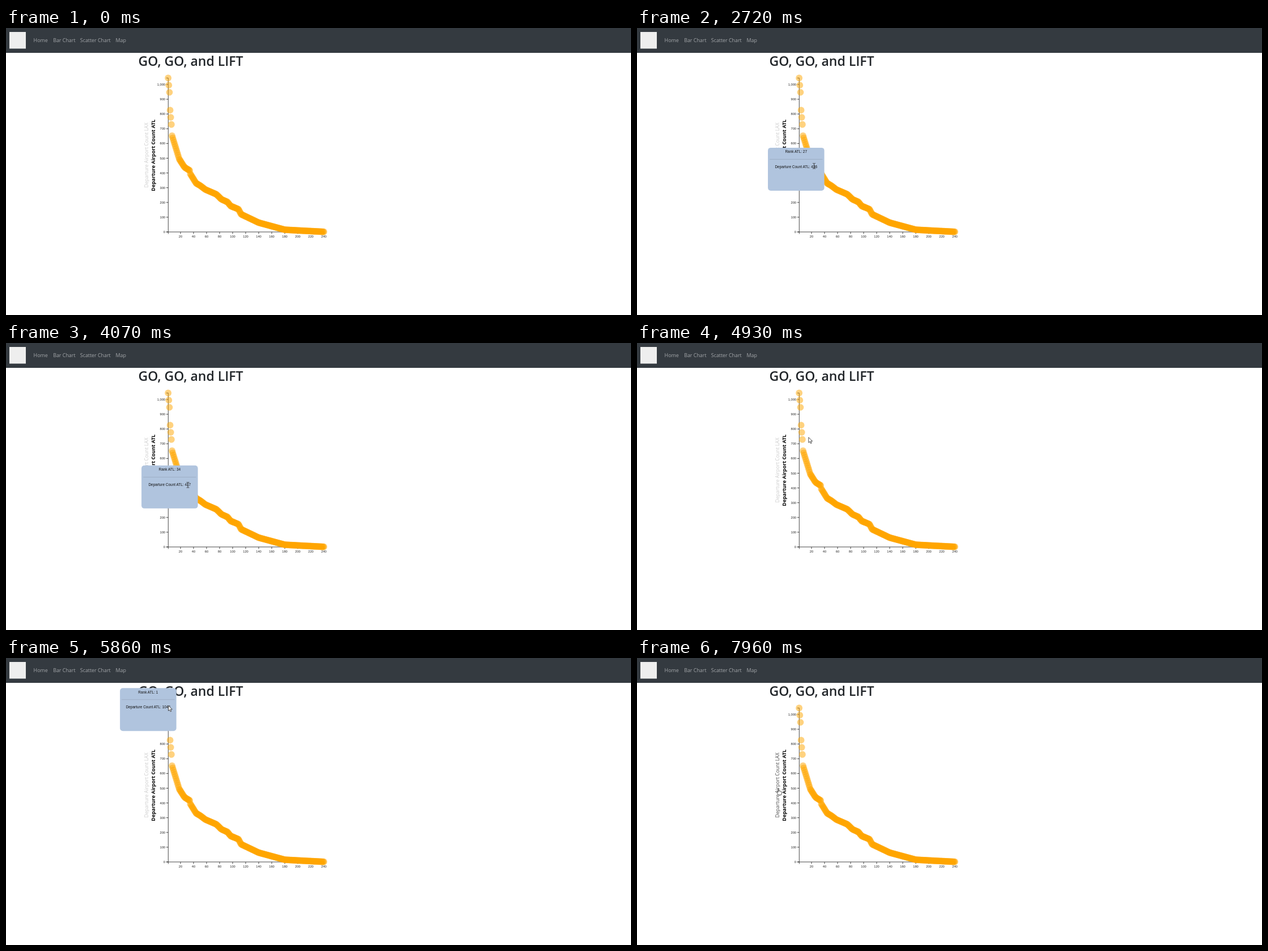
An HTML page for the animation above (8 s loop, 1103x508 px).

```html
<!DOCTYPE html>
<html lang="en">
<head>
<meta charset="utf-8">
<title>Departures</title>
<style>
  html, body { margin: 0; width: 100%; height: 100%; overflow: hidden; background: #fff; }
  svg { display: block; width: 1103px; height: 508px; }
  .ui { font-family: "Open Sans", "Noto Sans", sans-serif; }
  .num { font-family: "Liberation Sans", Arial, sans-serif; }
  .nav { font-size: 8.9px; fill: #a4a7aa; }
  .head { font-size: 23px; font-weight: 600; fill: #212529; }
  .tick { font-size: 5.7px; fill: #222; }
  .axis { fill: none; stroke: #333; stroke-width: .9; }
  .tip { font-size: 6.45px; fill: #111; text-anchor: middle; }
  .label { text-anchor: middle; }
  .cursor { fill: #fff; stroke: #222; stroke-width: .8; stroke-linejoin: round; }
</style>
</head>
<body>
<svg viewBox="0 0 1103 508">
  <rect width="1103" height="44" fill="#343a40"/>
  <rect x="6" y="7" width="29" height="29.5" fill="#eee"/>
  <g class="ui nav">
    <text x="48.6" y="25.1">Home</text>
    <text x="83.2" y="25.1">Bar Chart</text>
    <text x="130.8" y="25.1">Scatter Chart</text>
    <text x="193.6" y="25.1">Map</text>
  </g>
  <text class="ui head" x="233.5" y="67.4">GO, GO, and LIFT</text>
  <g id="axes"></g>
  <g id="dots" fill="#ffa500" fill-opacity=".5"></g>
  <g class="ui label">
    <text id="lax" transform="translate(251.3 225) rotate(-90)" font-size="8.6">Departure Airport Count LAX</text>
    <text transform="translate(263 225.3) rotate(-90)" font-size="8.88" font-weight="700">Departure Airport Count ATL</text>
  </g>
  <g id="tip" class="num tip">
    <rect width="99.5" height="76" rx="5" fill="#b0c4de"/>
    <path d="M3 20.5H96.5" stroke="#000" stroke-opacity=".14" stroke-width=".8"/>
    <text id="rank" x="49.7" y="9.5"></text>
    <text id="count" x="49.7" y="35.9"></text>
  </g>
  <path id="arrow" class="cursor" d="M.5 .6V10L2.7 8 4.2 11.4 5.8 10.7 4.3 7.4H7.3Z"/>
  <path id="beam" class="cursor" style="fill:none" d="M.6 .6H2.4L3 1.1 3.6 .6H5.4M3 1.1V9.5M.6 10H2.4L3 9.5 3.6 10H5.4"/>
  <path id="hand" class="cursor" d="M3 7V1.3Q3.7 .2 4.5 1.3V5Q5.3 4.3 6 5.2 6.9 4.6 7.5 5.6 8.6 5.2 9.2 6.5V9.2L8.3 12H4L1 8.3Q.5 7 1.7 6.8Z"/>
</svg>
<script>
const LOOP = 8000, STEP = 70;
const $ = id => document.getElementById(id);
const px = rank => 285 + 1.15 * rank;
const py = count => 361 - 0.261 * count;

function add(parent, tag, attrs, text = '') {
  const el = document.createElementNS(parent.namespaceURI, tag);
  for (const k in attrs) el.setAttribute(k, attrs[k]);
  el.textContent = text;
  parent.append(el);
}

// Bends of the curve as rank, count; straight in between
const bends = [
  [1, 1044], [3, 947], [4, 826], [6, 729], [7, 653], [18, 495], [25, 446],
  [27, 436], [34, 417], [35, 394], [44, 330], [50, 315], [58, 288], [75, 255],
  [83, 221], [92, 203], [97, 176], [109, 154], [113, 120], [140, 63], [180, 15], [240, 1]
];
function countAt(rank) {
  const i = bends.findIndex(b => b[0] >= rank);
  const [r1, c1] = bends[i], [r0, c0] = bends[Math.max(0, i - 1)];
  return r1 === rank ? c1 : c0 + (c1 - c0) * (rank - r0) / (r1 - r0);
}

let lines = `M282.8 88.5H286.3V361H282.8M286.3 364.5V361H561V364.5`;
for (let v = 0; v <= 1000; v += 100) {
  lines += `M282.8 ${py(v)}H286.3`;
  add($('axes'), 'text', { class: 'num tick', x: 281, y: py(v) + 2, 'text-anchor': 'end' }, v.toLocaleString('en-US'));
}
for (let v = 20; v <= 240; v += 20) {
  lines += `M${px(v)} 361V364.5`;
  add($('axes'), 'text', { class: 'num tick', x: px(v), y: 370.5, 'text-anchor': 'middle' }, v);
}
add($('axes'), 'path', { class: 'axis', d: lines });
for (let rank = 1; rank <= 240; rank++) {
  add($('dots'), 'circle', { cx: px(rank), cy: py(countAt(rank)), r: 5.9 });
}

// The pointer's legs: each glides on from where the one before ended
const legs = [
  { from: 330, to: 1030, x: 421, y: 290 },
  { from: 1230, to: 1580, x: 309.5, y: 242 },
  { from: 2590, to: 2590, x: 309.5, y: 239 },
  { from: 3720, to: 4000, x: 318, y: 246 },
  { from: 4800, to: 5200, x: 286, y: 83.5 },
  { from: 7050, to: 7820, x: 246, y: 230.5 }
];

// When the tooltip shows, and how long until the pointer turns into a beam
const hovers = [
  { rank: 25, from: 1580, to: 1650, wait: 470 },
  { rank: 27, from: 2590, to: 3720, wait: 130 },
  { rank: 34, from: 4000, to: 4800, wait: STEP },
  { rank: 1, from: 5340, to: 5470, wait: 60 },
  ...[5200, 5860, 6130, 7050].map(from => ({ rank: 1, from, to: from + STEP, wait: STEP }))
].sort((a, b) => a.from - b.from);

function pointerAt(t) {
  const p = { x: 1172, y: 543, gliding: false };
  for (const leg of legs.filter(l => l.from <= t)) {
    p.gliding = t < leg.to;
    const n = Math.round((leg.to - leg.from) / STEP) + 1;
    const part = p.gliding ? Math.floor(1 + (t - leg.from) / (leg.to - leg.from) * (n - 1) + 1e-6) / n : 1;
    const ease = 1 - (1 - part) ** 2;
    p.x += (leg.x - p.x) * ease;
    p.y += (leg.y - p.y) * ease;
  }
  return p;
}

function draw(t) {
  const p = pointerAt(t);
  const hover = hovers.findLast(h => h.from <= t);
  const last = legs.at(-1);
  const resting = hover && !p.gliding && t >= hover.from + hover.wait;
  const cursor = t < legs[0].from ? '' : t >= last.to ? 'hand' : resting ? 'beam' : 'arrow';
  for (const id of ['arrow', 'beam', 'hand']) {
    $(id).style.display = id === cursor ? '' : 'none';
    $(id).setAttribute('transform', `translate(${p.x} ${p.y})`);
  }

  const shown = hover && t < hover.to;
  $('tip').style.display = shown ? '' : 'none';
  if (shown) {
    const count = countAt(hover.rank);
    $('tip').setAttribute('transform', `translate(${px(hover.rank) - 85} ${py(count) - 35.3})`);
    $('rank').textContent = `Rank ATL: ${hover.rank}`;
    $('count').textContent = `Departure Count ATL: ${count}`;
  }

  // The grey label darkens in steps under the hand
  const fade = Math.min(3, Math.max(0, Math.floor((t - last.to) / STEP) + 1));
  const grey = 204 - 43 * fade;
  $('lax').style.fill = `rgb(${grey},${grey},${grey})`;
}

const began = performance.now();
function tick() {
  draw((performance.now() - began) % LOOP);
  requestAnimationFrame(tick);
}
tick();
</script>
</body>
</html>
```
